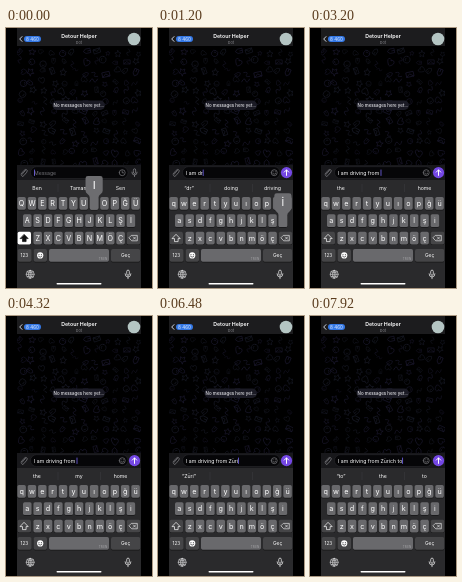
Recreate the animation shown at these times as an HTML page. Size 146 px wide and 260 px high, loop 8 s.

```html
<!DOCTYPE html>
<html lang="en">
<head>
<meta charset="utf-8">
<style>
html, body { margin: 0; width: 100%; height: 100%; overflow: hidden; background: #000; }
svg { display: block; width: 100vw; height: 100vh; font-family: Inter, "Liberation Sans", sans-serif; }
text { white-space: pre; }
</style>
</head>
<body>
<svg id="stage" viewBox="0 0 146 260"></svg>
<script>
const LOOP = 8000, HOLD = 100;
const stage = document.getElementById('stage');

function add(tag, attrs, parent = stage) {
  const el = document.createElementNS('http://www.w3.org/2000/svg', tag);
  for (const k in attrs) el.setAttribute(k, attrs[k]);
  return parent.appendChild(el);
}
const rect = (x, y, width, height, fill, rx = 0, parent) =>
  add('rect', { x, y, width, height, fill, rx }, parent);
const circle = (cx, cy, r, fill, parent) => add('circle', { cx, cy, r, fill }, parent);
const line = (d, stroke = '#ddd', width = .7, parent) => add('path', {
  d, stroke, fill: 'none', 'stroke-width': width, 'stroke-linecap': 'round', 'stroke-linejoin': 'round'
}, parent);
function label(str, x, y, size, fill = '#fff', anchor = 'middle', weight = 400, parent) {
  const el = add('text', { x, y, fill, 'font-size': size, 'text-anchor': anchor, 'font-weight': weight }, parent);
  el.textContent = str;
  return el;
}
const show = (el, on) => el.setAttribute('visibility', on ? 'visible' : 'hidden');
function setText(el, str) { if (el.textContent !== str) el.textContent = str; }

// Chat wallpaper: seeded faint doodles
let seed = 11;
const rnd = () => (seed = seed * 16807 % 2147483647) / 2147483647;
const doodles = [
  'M-3 0a3 3 0 1 0 6 0a3 3 0 1 0-6 0M-1 1q1 1 2 0',
  'M-3-2h6v4h-6zl3 2.5l3-2.5',
  'M0-3l1 2l2 .3l-1.5 1.5l.4 2.2l-1.9-1l-1.9 1l.4-2.2l-1.5-1.5l2-.3z',
  'M0 3q-5-4-2-5.5q2 0 2 1.5q0-1.5 2-1.5q3 1.5 0 5.5z',
  'M-3 2q1-5 3-2t3-2',
  'M-2 3v-4l2-2l2 2v4zM0 3v-2'
];
const wall = add('g', {});
for (let row = 0; row < 12; row++)
  for (let col = 0; col < 12; col++) {
    const x = 16 + col * 10.4 + rnd() * 5 - 2.5, y = 24 + row * 10 + rnd() * 5 - 2.5;
    const d = doodles[Math.floor(rnd() * doodles.length)];
    const p = line(d, rnd() < .5 ? '#1d1b31' : '#1a1c29', .55, wall);
    p.setAttribute('transform', `translate(${x} ${y}) rotate(${rnd() * 360}) scale(${.7 + rnd() * .5})`);
  }
rect(0, 18, 11, 120, '#000');
rect(135, 18, 11, 120, '#000');

// Header
rect(11, 0, 124, 18, '#1c1c1e');
line('M16 8.6l-2.3 2.4l2.3 2.4', '#dfe6f2', .9);
rect(18, 8, 17, 6, '#3478e5', 3);
label('8 460', 26.5, 12.7, 4.6, '#e6efff');
label('Detour Helper', 73, 10.2, 5.3, '#fff', 'middle', 600);
label('bot', 73, 15.6, 3.9, '#85858a');
circle(128, 11, 6.3, '#b4c5c3');

// Empty chat notice
rect(46.5, 72.5, 52.5, 9.5, '#1b1b25', 4.7);
label('No messages here yet...', 73, 79, 4.4, '#e4e4e8', 'middle', 500);

// Message bar
rect(11, 137, 124, 15, '#18181b');
rect(24.5, 138.7, 97.5, 11.8, '#060608', 5.9).setAttribute('stroke', '#2c2c31');
stage.lastChild.setAttribute('stroke-width', .5);
line('M19.5 142.3l-3.6 4.2q-.8 1.4.4 1.9q.7.2 1.5-.7l3-3.5q1.1-1.8-.3-2.6q-1.2-.6-2.3.7l-3.2 3.7', '#8e8e93', .65);
const hint = label('Message', 28, 146.5, 5.15, '#737378', 'start');
const typed = label('', 28, 146.5, 5.15, '#fff', 'start');
const caret = rect(28, 141.5, .8, 6.4, '#7566f0', .3);
line('M113.2 144.7a3 3 0 1 0 6 0a3 3 0 1 0-6 0', '#8e8e93', .6);
const timer = line('M116.2 142.9v1.9h1.4', '#8e8e93', .6);
const smile = line('M115.1 143.7v.2M117.3 143.7v.2M114.7 145.5q1.5 1.8 3 0', '#8e8e93', .6);
function mic(x, y, s, color) {
  const g = add('g', { transform: `translate(${x} ${y}) scale(${s})` });
  line('M-1.3-3q0-1.3 1.3-1.3t1.3 1.3v2.6q0 1.3-1.3 1.3t-1.3-1.3zM-2.9-.6q0 3.2 2.9 3.2t2.9-3.2M0 2.6v1.7', color, .8, g);
  return g;
}
const barMic = mic(128.5, 144.7, .9, '#8e8e93');
const send = add('g', {});
circle(0, 0, 5.6, '#7447e4', send);
line('M0 2.8v-5.4M-2.2-.5l2.2-2.2l2.2 2.2', '#fff', 1, send);

// Keyboard
rect(11, 152, 124, 108, '#2a2a2c');
const picked = rect(52.5, 154, 41.5, 12, '#6b6b6e', 2.2);
rect(51.8, 156, .4, 8, '#434346');
rect(94.2, 156, .4, 8, '#434346');
const hints = [31, 73, 114.5].map(x => label('', x, 161.9, 5.2));

const LETTER = '#69696c', DARK = '#454547';
function keyCap(x, y, w, fill) {
  rect(x, y + .6, w, 12.8, '#161617', 1.7);
  return rect(x, y, w, 12.8, fill, 1.7);
}
const keys = {};
[['qwertyuıopğü', 15.6, 169], ['asdfghjklşi', 21.3, 186.3], ['zxcvbnmöç', 31.7, 203.7]].forEach(([row, x0, y]) =>
  [...row].forEach((ch, i) => {
    const x = x0 + i * 10.36;
    keyCap(x - 4.3, y, 8.6, LETTER);
    keys[ch] = { x, y, el: label(ch, x, y + 8.8, 7.2) };
  }));
const shiftCap = keyCap(11.6, 203.7, 13.4, DARK);
const arrow = line('M18.3 206.6l3.9 4h-2.1v3h-3.6v-3h-2.1z', '#fff', .7);
keyCap(120.8, 203.7, 13.4, DARK);
line('M125.7 207.4h5.6v5.4h-5.6l-2.5-2.7zM127.3 208.9l2.4 2.4M129.7 208.9l-2.4 2.4', '#fff', .6);
keyCap(11.6, 221, 14, DARK);
label('123', 18.4, 229.1, 4.7);
keyCap(27.6, 221, 13.4, DARK);
circle(34.2, 227.4, 3.1, '#fff');
line('M33 226.4v.4M35.4 226.4v.4', DARK, .8);
line('M32.5 228.3q1.7 2 3.4 0', DARK, .8);
const spaceCap = keyCap(43, 221, 60, LETTER);
label('TR EN', 97, 232, 2.9, '#a9a9ac');
keyCap(105, 221, 29.2, DARK);
label('Geç', 119.6, 229.1, 4.9);

// Globe, dictation and home indicator
line('M20.2 246.3a4 4 0 1 0 8 0a4 4 0 1 0-8 0h8M24.2 242.3v8M24.2 242.3q-4 4 0 8q4-4 0-8M21.2 243.9q3 1.4 6 0M21.2 248.7q3-1.4 6 0', '#e2e2e4', .6);
mic(122, 246.4, 1, '#e2e2e4');
rect(50.5, 255, 45, 1.6, '#fff', .8);

// Key preview bubble, drawn around x = 0 and the top of its key
const bubble = add('g', {});
add('path', {
  d: 'M-6.2-21h12.4q2.4 0 2.4 2.4v12q0 2-2 3.7q-2.3 1.6-2.3 4v10q0 1.7-1.7 1.7h-5.2q-1.7 0-1.7-1.7v-10q0-2.4-2.3-4q-2-1.7-2-3.7v-12q0-2.4 2.4-2.4z',
  fill: '#6d6d70'
}, bubble);
const bubbleText = label('', 0, -8, 11, '#fff', 'middle', 400, bubble);

// Typing script: release time, text inserted
const strokes = [
  [80, 'I'], [320, ' '], [480, 'a'], [640, 'm'], [800, ' '], [960, 'd'], [1120, 'r'],
  [1280, 'i'], [1440, 'v'], [1600, 'i'], [1880, 'ng'], [2080, ' '],
  [2320, 'f'], [2500, 'r'], [2700, 'o'], [2880, 'm'], [3080, ' '],
  [5440, 'Z'], [5800, 'ü'], [6080, 'r'], [6400, 'i'], [6640, 'c'], [6880, 'h'],
  [7200, ' '], [7520, 't'], [7760, 'o']
];
const SHIFT_ON = 4880, SHIFT_OFF = 5440;
const offers = [
  [0, 'Ben', 'Tamam', 'Sen'], [160, '“I”', 'I’m', 'In'], [400, 'am', 'have', 'will'],
  [560, '“a”', 'am', 'and'], [720, '“am”', 'am', 'amazing'], [880, 'not', 'going', 'a'],
  [1040, '“d”', 'doing', 'done'], [1180, '“dr”', 'doing', 'driving'],
  [1360, '“dri”', 'driving', 'drinking'], [1520, '“driv”', 'driving', 'drive'],
  [1680, '“drivi”', 'driving', 'driving'], [2080, 'to', 'home', 'now'],
  [2400, '“f”', 'for', 'from'], [2580, '“fr”', 'from', 'free'], [2780, '“fro”', 'from', 'front'],
  [2960, '“from”', 'from', 'front'], [3160, 'the', 'my', 'home'], [SHIFT_ON, 'The', 'My', 'Home'],
  [5600, '“Z”', 'Zoo', 'Zone'], [5880, '“Zü”', '', ''], [6160, '“Zür”', '', ''], [6440, '“Züri”', '', ''],
  [6720, '“Züric”', 'Zürich', ''], [6960, '“Zürich”', 'Zürich', ''], [7280, 'to', 'and', 'the'],
  [7600, '“t”', 'to', 'the'], [7840, '“to”', 'the', 'to']
];

function draw(t) {
  const done = strokes.filter(s => s[0] <= t);
  const text = done.map(s => s[1]).join('');
  const last = done.length ? done[done.length - 1][0] : 0;
  const upper = t < 80 || (t >= SHIFT_ON && t < SHIFT_OFF);

  setText(typed, text);
  show(hint, !text);
  const idle = t - last;
  show(caret, idle < 500 || (idle - 500) % 1000 >= 500);
  caret.setAttribute('x', 28 + (text ? typed.getComputedTextLength() : 0));

  const grow = Math.min(1, Math.max(0, (t - 80) / 160));
  send.setAttribute('transform', `translate(128.5 144.6) scale(${grow})`);
  show(barMic, grow < .5);
  show(timer, !text);
  show(smile, text);

  const offer = offers.filter(o => o[0] <= t).pop();
  hints.forEach((el, i) => setText(el, offer[i + 1]));
  show(picked, t >= 1800 && t < 2000);

  for (const ch in keys) setText(keys[ch].el, upper ? ch.toLocaleUpperCase('tr') : ch);
  shiftCap.setAttribute('fill', upper ? '#fff' : DARK);
  arrow.setAttribute('stroke', upper ? '#111' : '#fff');
  arrow.setAttribute('fill', upper ? '#111' : 'none');

  const press = strokes.find(s => t >= s[0] - HOLD && t < s[0]);
  const key = press && keys[press[1].toLocaleLowerCase('tr')];
  spaceCap.setAttribute('fill', press && press[1] === ' ' ? DARK : LETTER);
  show(bubble, key);
  if (key) {
    const x = Math.max(20, Math.min(126, key.x));
    bubble.setAttribute('transform', `translate(${x} ${key.y})`);
    setText(bubbleText, press[1]);
  }
}

const start = performance.now();
function tick() {
  draw((performance.now() - start) % LOOP);
  requestAnimationFrame(tick);
}
tick();
</script>
</body>
</html>
```
